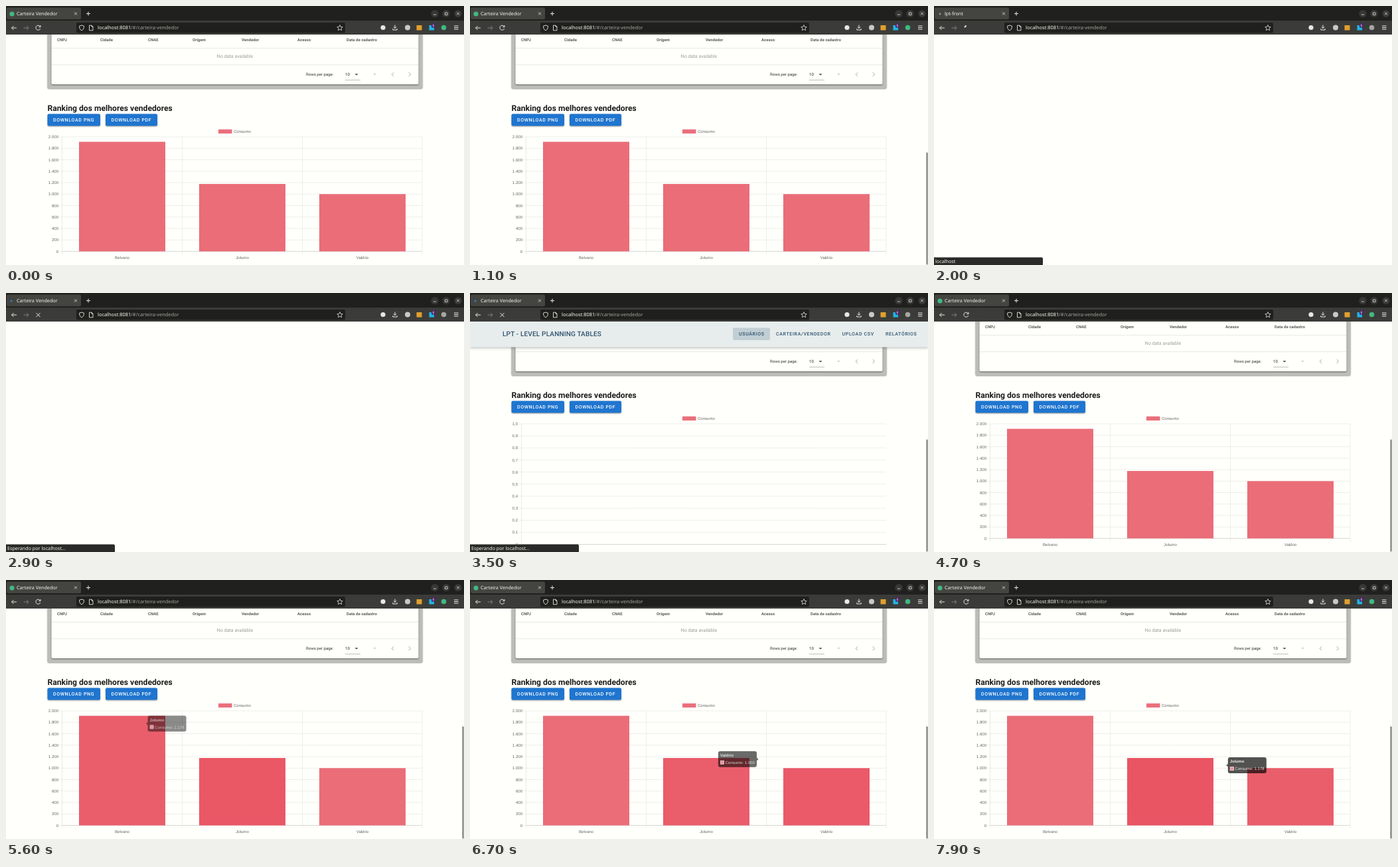
An HTML page with a canvas for the animation above (8 s loop, 690x390 px).

```html
<!DOCTYPE html>
<html lang="pt">
<head>
<meta charset="utf-8">
<title>Carteira Vendedor</title>
<style>
html, body { margin: 0; width: 100%; height: 100%; overflow: hidden; background: #fffffc; }
canvas { display: block; }
</style>
</head>
<body>
<canvas id="stage" width="690" height="390"></canvas>
<script>
const ctx = document.getElementById('stage').getContext('2d');
ctx.textRendering = 'geometricPrecision';
const LOOP = 8000, RELOAD = 1900, TITLE = 2800, CONTENT = 3000, DATA = 3600;
const UI = '"Noto Sans", sans-serif', WEB = 'Roboto, sans-serif';
const CHART = '"Liberation Sans", Arial, sans-serif';
const PAGE = '#fffffc', INK = '#e8e8e4', GREEN = '#42b883';
const BASE = 369.5, TOP = 197, SCALE = (BASE - TOP) / 2000;

const sellers = [
  { name: 'Belvano', value: 1912, label: '1.912', x: 110, tipX: 180 },
  { name: 'Jolumo', value: 1178, label: '1.178', x: 291, tipX: 361 },
  { name: 'Valdrio', value: 1000, label: '1.000', x: 472, tipX: 474 }
];
// When the pointer enters each bar
const hovers = [
  { at: 5480, bar: 0 }, { at: 5581, bar: 1 }, { at: 6689, bar: 2 }, { at: 7870, bar: 1 }
];

const clamp = v => Math.max(0, Math.min(1, v));
const easeOut = v => 1 - (1 - clamp(v)) ** 4;
const mix = (a, b, k) => a + (b - a) * k;

function rect(x, y, w, h, color, radius = 0) {
  ctx.fillStyle = color;
  ctx.beginPath();
  ctx.roundRect(x, y, w, h, radius);
  ctx.fill();
}
function circle(x, y, r, color) {
  ctx.fillStyle = color;
  ctx.beginPath();
  ctx.arc(x, y, r, 0, 7);
  ctx.fill();
}
function stroke(path, color = INK, width = 1) {
  ctx.strokeStyle = color;
  ctx.lineWidth = width;
  ctx.stroke(new Path2D(path));
}
function text(str, x, y, size, family, color, { weight = 400, align = 'left', spacing = 0 } = {}) {
  ctx.font = `${weight} ${size}px ${family}`;
  ctx.letterSpacing = spacing + 'px';
  ctx.textAlign = align;
  ctx.fillStyle = color;
  ctx.fillText(str, x, y);
  ctx.letterSpacing = '0px';
}
function withShadow(blur, offset, color, draw) {
  ctx.save();
  ctx.shadowBlur = blur;
  ctx.shadowOffsetY = offset;
  ctx.shadowColor = color;
  draw();
  ctx.restore();
}

function browser(t) {
  const loading = t >= RELOAD && t < DATA;
  const blankTitle = t >= RELOAD && t < TITLE;
  rect(0, 0, 690, 22, '#20211f');
  rect(1, 2.5, 112, 17.5, '#444541', 2);
  rect(0, 22, 690, 21, '#3b3c39');

  if (!loading) circle(9, 12, 3.6, GREEN);
  else circle(blankTitle ? 9 : 8, 12, 1.4, blankTitle ? '#96968f' : '#2d86c9');
  text(blankTitle ? 'lpt-front' : 'Carteira Vendedor', 16, 14.4, 7.2, UI, '#f4f4ef');
  stroke('M103 9.5l4 4m0-4l-4 4', INK, .8);
  stroke('M121 11.5h6m-3-3v6');

  for (const x of [646, 663, 681]) circle(x, 11.5, 5.6, '#383936');
  stroke('M644 13h4M661.5 10h3.5v3.5h-3.5zM679 9.5l4 4m0-4l-4 4', INK, .8);

  stroke('M16 33H8.5m3-3l-3 3l3 3');
  stroke('M26.5 33H34m-3-3l3 3l-3 3', '#80817c');
  if (!loading) stroke('M51.5 31a3.5 3.5 0 1 0 .2 3M52 29v2.6h-2.6');
  else if (t < RELOAD + 200) stroke('M46 32l2.5-2.5', INK, 2);
  else stroke('M45.5 30l6 6m0-6l-6 6');

  rect(106, 25, 405, 15.5, '#1f201d', 2);
  stroke('M114 29l3.5 1.2c0 3-.6 5-3.5 6.8c-2.9-1.8-3.5-3.8-3.5-6.8z', INK, .9);
  stroke('M125.5 29.2h3.5l2 2v5.6h-5.5zM129 29.2v2h2', INK, .9);
  text('localhost:8081', 138, 35.3, 7.4, UI, '#f7f7f2');
  text('/#/carteira-vendedor', 138 + ctx.measureText('localhost:8081').width, 35.3, 7.4, UI, '#a3a49f');
  stroke('M503 28.6l1.2 2.7l3 .3l-2.2 2l.6 3l-2.6-1.5l-2.6 1.5l.6-3l-2.2-2l3-.3z', INK, .8);

  circle(568, 32.5, 3.6, INK);
  stroke('M586 28.5v5m-2.3-2.2l2.3 2.3l2.3-2.3M582.8 34v2h6.4v-2');
  circle(605, 32.5, 4, '#c9c9c5');
  rect(618.5, 29, 8, 7.5, '#e0a02f');
  rect(637.5, 29, 7.5, 7.5, '#1fb4e6');
  rect(641, 26, 6, 6.5, '#4b2268', 1);
  text('6', 644, 31.2, 5, UI, '#fff', { align: 'center' });
  circle(659.5, 32.5, 3.8, loading ? '#a5a6a2' : GREEN);
  stroke('M675 30h6.5m-6.5 2.5h6.5m-6.5 2.5h6.5');
}

function table() {
  withShadow(2, 1, 'rgba(0,0,0,.4)', () => rect(62.5, 30, 565, 94, '#bcbdb9', 2));
  withShadow(2, 1, 'rgba(0,0,0,.5)', () => rect(68.5, 30, 553, 88, PAGE, 2));
  const heads = { CNPJ: 77, Cidade: 142, CNAE: 214, Origem: 281, Vendedor: 355, Acesso: 439, 'Data de cadastro': 513 };
  for (const [name, x] of Object.entries(heads))
    text(name, x, 53, 6.06, WEB, '#5d5d5b', { weight: 700 });
  stroke('M69 63.5H621M69 88.5H621', '#e2e2df', .8);
  text('No data available', 345, 77.6, 7.07, WEB, '#9b9b98', { align: 'center' });
  text('Rows per page:', 452, 105.2, 6.06, WEB, '#333331');
  text('10', 511, 105.2, 6.06, WEB, '#222');
  ctx.fillStyle = '#555';
  ctx.fill(new Path2D('M525.5 102h5l-2.5 2.6z'));
  stroke('M511 111.5H534', '#91918e', .6);
  text('–', 555.5, 105.2, 6.06, WEB, '#444', { align: 'center' });
  stroke('M584.2 100l-3 3l3 3M606.6 100l3 3l-3 3', '#9d9d99', .9);
}

function button(label, x, w) {
  withShadow(2, 1, 'rgba(0,0,0,.4)', () => rect(x, 162.6, w, 18, '#1f75cf', 2));
  text(label, x + 8.5, 173.8, 7.07, WEB, '#fff', { weight: 500, spacing: .63 });
}

function axes(ready) {
  const left = ready ? 84.5 : 77.5, bottom = ready ? BASE : 378.5;
  rect(320, 185.8, 20.5, 6.2, '#ea707b');
  text('Consumo', 343, 190.8, 6.06, CHART, '#666');
  for (let i = 0; i <= 10; i++) {
    const y = mix(TOP, bottom, i / 10), n = 10 - i;
    let label = n === 0 ? '0' : (n / 10).toFixed(1).replace('.', ',');
    if (ready) label = (n * 200 / 1000).toFixed(3).replace(/^0\.0*/, '') || '0';
    stroke(`M${left - 4.5} ${y}H627`, '#e5e5e2', .7);
    text(label, left - 5.5, y + 2.1, 6.06, CHART, '#666', { align: 'right' });
  }
  stroke(`M${left} ${TOP}V${bottom + (ready ? 4 : 0)}`, '#dededb', .7);
  stroke(`M${left} ${bottom}H627`, '#cfcfcc', .7);
  if (!ready) return;
  stroke(`M265.5 ${TOP}V374M446.5 ${TOP}V374M627 ${TOP}V374`, '#e5e5e2', .7);
  for (const s of sellers)
    text(s.name, s.x + 65, 380.6, 6.06, CHART, '#666', { align: 'center' });
}

function bars(t, hover, previous) {
  const grow = t < RELOAD ? 1 : easeOut((t - DATA) / 460);
  const spread = t < RELOAD ? 0 : (1 - clamp((t - 3700) / 500)) ** 2;
  sellers.forEach((s, i) => {
    let heat = 0;
    if (hover && hover.bar === i) heat = clamp(.65 + (t - hover.at) / 100);
    else if (previous && previous.bar === i) heat = .65 * (1 - clamp((t - hover.at) / 400));
    const height = s.value * SCALE * grow;
    rect(s.x + 14.3 * i * spread, BASE - height, 130 + 9.7 * spread, height,
      `rgb(234, ${mix(109, 84, heat)}, ${mix(120, 99, heat)})`);
  });
}

function tooltip(t, hover, previous) {
  const target = sellers[hover.bar], origin = sellers[(previous || hover).bar];
  const k = easeOut((t - hover.at) / 400);
  const x = mix(origin.tipX, target.tipX, k);
  const y = BASE - mix(origin.value, target.value, k) * SCALE;
  const fadeIn = (t - hovers[0].at) / 200;
  ctx.save();
  ctx.globalAlpha = clamp(t < 6000 ? fadeIn : .7 + (t - hover.at) / 150);
  const caret = hover.bar === 2 ? `M${x + 58} ${y - 2.5}l2.5 2.5l-2.5 2.5z` : `M${x} ${y - 2.5}l-2.5 2.5l2.5 2.5z`;
  rect(x, y - 12, 58, 24, 'rgba(0,0,0,.75)', 3);
  ctx.fill(new Path2D(caret));
  text(target.name, x + 3, y - 3.6, 6.06, CHART, '#fff', { weight: 700 });
  rect(x + 3, y + 2, 6, 6, '#fff');
  rect(x + 3.5, y + 2.5, 5, 5, '#ea8a94');
  text('Consumo: ' + target.label, x + 10.5, y + 7.2, 6.06, CHART, '#fff');
  ctx.restore();
}

function appBar(shift) {
  ctx.save();
  ctx.translate(0, -41 * shift);
  withShadow(4, 1.5, 'rgba(0,0,0,.25)', () => rect(0, 42, 690, 40, '#e7eded'));
  text('LPT - LEVEL PLANNING TABLES', 49, 65.7, 10.1, WEB, '#2f536e', { weight: 500, spacing: .13 });
  rect(396, 53, 56, 18.3, '#c1ced3', 2);
  const links = { 'USUÁRIOS': 405, 'CARTEIRA/VENDEDOR': 461, 'UPLOAD CSV': 560.5, 'RELATÓRIOS': 626 };
  for (const [name, x] of Object.entries(links))
    text(name, x, 64.6, 7.07, WEB, '#2f536e', { weight: 500, spacing: .63 });
  ctx.restore();
}

function page(t) {
  rect(0, 43, 690, 347, PAGE);
  if (t >= RELOAD && t < CONTENT) return;
  const ready = t < RELOAD || t >= DATA;
  const index = hovers.findLastIndex(h => t >= h.at);
  const hover = hovers[index], previous = hovers[index - 1];
  table();
  text('Ranking dos melhores vendedores', 62.5, 157.5, 12.15, WEB, '#1d1d1c', { weight: 700 });
  button('DOWNLOAD PNG', 62.5, 79.5);
  button('DOWNLOAD PDF', 150, 78);
  axes(ready);
  if (ready) bars(t, hover, previous);
  if (hover) tooltip(t, hover, previous);
  if (t >= CONTENT && t < DATA) appBar(clamp((t - 3500) / 100));
  if (t >= 500) rect(687.5, 220.5, 2, 169, '#737471', 1);
}

function statusBar(t) {
  if (t < RELOAD || t >= DATA) return;
  rect(0, 378.6, 164, 11.4, '#2a2b28', [0, 2, 0, 0]);
  text(t < TITLE ? 'localhost' : 'Esperando por localhost…', 2, 387, 7.2, UI, '#f4f4ef');
}

function draw(t) {
  page(t);
  browser(t);
  statusBar(t);
}

const start = performance.now();
function frame() {
  draw((performance.now() - start) % LOOP);
  requestAnimationFrame(frame);
}
frame();
</script>
</body>
</html>
```
